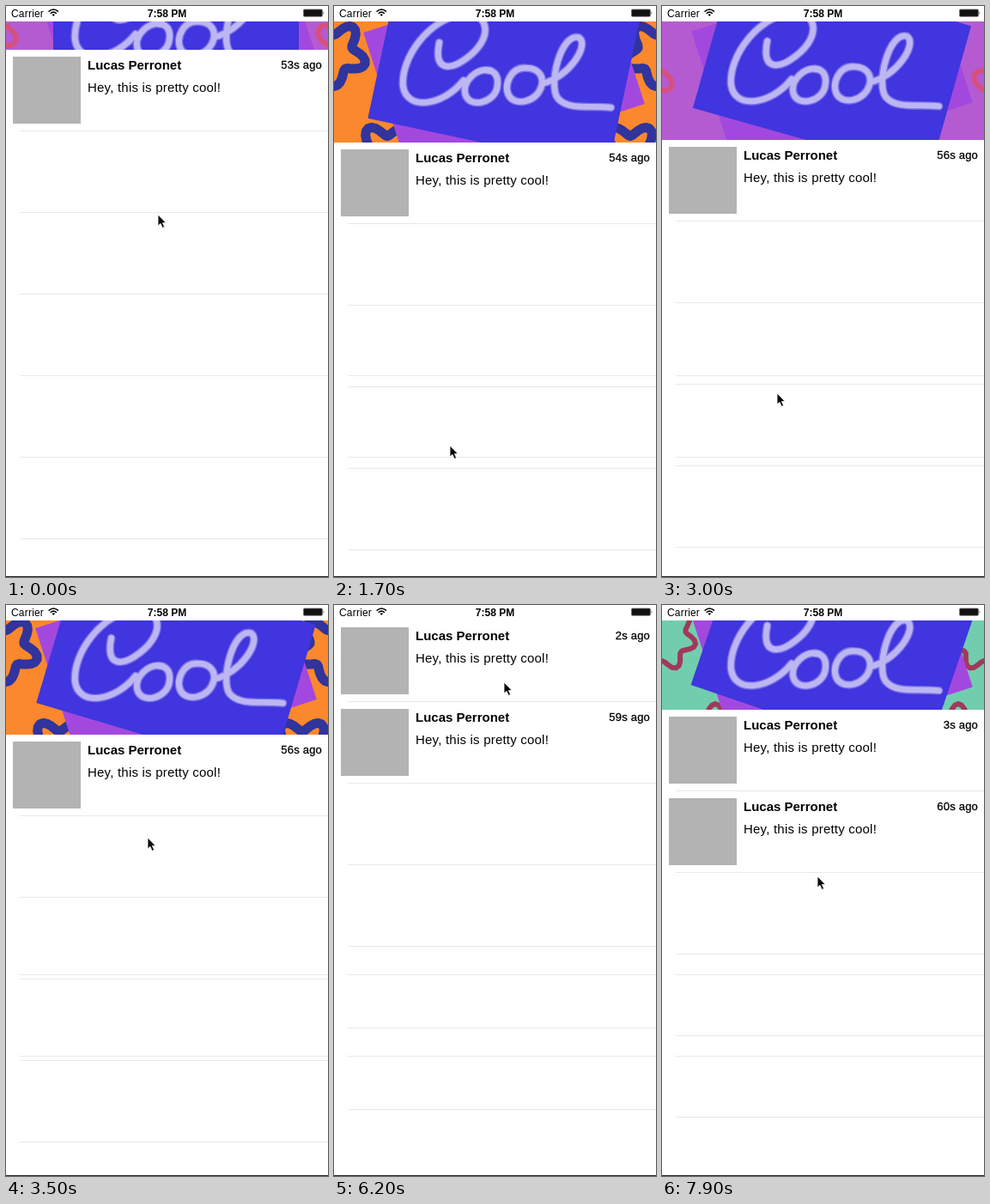
These frames come from a looping animation (375x665 px, 8 s). An HTML page:

```html
<!DOCTYPE html>
<html lang="en">
<head>
<meta charset="utf-8">
<title>Pull to refresh</title>
<style>
  html, body { margin: 0; width: 100%; height: 100%; overflow: hidden; background: #fff; }
  svg { display: block; font: 15px "Liberation Sans", Arial, sans-serif; }
  .name, .clock { font-weight: bold; }
  .msg { letter-spacing: .21px; }
  .ago { font-size: 13px; letter-spacing: .2px; text-anchor: end; stroke: #000; stroke-width: .3px; }
  .status { font-size: 12px; }
  .carrier { letter-spacing: .2px; }
  .brush { fill: none; stroke-linecap: round; stroke-linejoin: round; }
</style>
</head>
<body>
<svg width="375" height="665" viewBox="0 0 375 665">
  <defs>
    <clipPath id="window"><rect id="opening" y="18" width="375" height="0"/></clipPath>
    <g id="cell">
      <rect x="8" y="8" width="79" height="78" fill="#b3b3b3"/>
      <text class="name" x="95" y="23">Lucas Perronet</text>
      <text class="msg" x="95" y="49">Hey, this is pretty cool!</text>
    </g>
    <rect id="sheet" x="-143" y="-90" width="286" height="180"/>
    <path id="script" d="M121-48C114-12 135-14 155-30C186-54 180-85 150-82C110-78 75-30 78 5C82 35 125 30 150-2M182-14C165-18 148 0 152 15C157 33 188 25 190 5C192-8 186-14 178-14M224-17C206-18 198 3 203 15C209 30 238 26 243 3C245-10 236-17 224-17M243 2C275-5 300-45 287-54C265-60 250 5 262 20C275 35 300 28 325 31"/>
  </defs>
  <rect width="375" height="665" fill="#fff"/>
  <g clip-path="url(#window)">
    <g id="art">
      <rect id="ground" y="-120" width="375" height="240"/>
      <path id="doodle" class="brush"/>
      <use href="#sheet" fill="#a348df" transform="translate(198 -16) rotate(-18)"/>
      <use id="card" href="#sheet" fill="#4035de"/>
      <g class="brush" transform="translate(4 0) scale(.98 .96)">
        <use href="#script" stroke="#7a70e8" stroke-width="10"/>
        <use href="#script" stroke="#bcb6f3" stroke-width="7"/>
      </g>
    </g>
  </g>
  <g id="lines" fill="#e9e9eb"></g>
  <g id="fresh"><use href="#cell"/><text class="ago" x="368" y="22"></text></g>
  <g id="old"><use href="#cell"/><text class="ago" x="368" y="22"></text></g>
  <g class="status">
    <text class="carrier" x="6" y="12.5">Carrier</text>
    <text class="clock" x="187.5" y="12.5" text-anchor="middle">7:58 PM</text>
    <g fill="none" stroke="#000" stroke-width="1.5">
      <path d="M49.6 6.6Q55.3 1.3 61 6.6M51.7 8.8Q55.3 5.4 58.9 8.8"/>
      <path d="M53.6 10Q55.3 8.6 57 10L55.3 12Z" fill="#000" stroke="none"/>
    </g>
    <rect x="346.4" y="3.9" width="22" height="8.4" rx="1.2" fill="#111" stroke="#777" stroke-width=".8"/>
    <path d="M369.5 6.3q1.8 1.8 0 3.6z" fill="#333"/>
  </g>
  <rect y="664" width="375" height="1" fill="#222"/>
  <path id="cursor" d="M0 0V13L3 10.4L5.2 15.4L7.6 14.3L5.4 9.6H9.3Z" fill="#0a0a0a" stroke="#fff" stroke-width=".8"/>
</svg>
<script>
const $ = id => document.getElementById(id);
const set = (el, attrs) => { for (const k in attrs) el.setAttribute(k, attrs[k]); };
const move = (el, x, y) => set(el, { transform: `translate(${x} ${y})` });
const LOOP = 8000, STEP = 100, BAR = 18, ROW = 95, SECOND = 1050;

const mix = (a, b, u) => a + (b - a) * u;
const ramp = (t, t0, t1) => Math.min(1, Math.max(0, (t - t0) / (t1 - t0)));
const linear = u => u;
const out = u => 1 - (1 - u) ** 2;
const smooth = u => u * u * (3 - 2 * u);

// Each leg moves the value to a new place: start time, end time, goal, easing
const track = (t, from, ...legs) =>
  legs.reduce((v, [t0, t1, goal, ease = smooth]) => mix(v, goal, ease(ramp(t, t0, t1))), from);

const cursorX = t => track(t, 177, [0, 2200, 133, out], [2900, 4500, 234],
  [4600, 5100, 198], [6300, 7330, 175], [7330, 7900, 181]);
const cursorY = t => track(t, 243, [0, 2200, 591, linear], [2700, 4600, 110, out],
  [4600, 5100, 90], [6300, 7330, 392], [7330, 7900, 316]);

// Rubber band: the further the drag, the less the list follows
const rubber = drag => 620 * (1 - 1 / (1 + .55 * drag / 620));

function pullAt(t) {
  if (t < 2700) return rubber(cursorY(t) - 179);
  if (t < 6300) return track(t, 166, [2700, 3100, 133], [3800, 4300, 0]);
  return rubber(cursorY(t - 30) - 90);
}

// Wavy rings peeking out on both sides of the card
function rings({ y, radius, lobes, wave }) {
  let d = "";
  for (const [cx, cy] of [[0, y], [375, y], [62, y + 118], [345, y + 118]]) {
    for (let a = 0; a <= 360; a += 6) {
      const r = radius + wave * Math.sin(lobes * a * Math.PI / 180);
      d += (a ? "L" : "M") + (cx + r * Math.cos(a * Math.PI / 180)).toFixed(1)
        + " " + (cy + r * Math.sin(a * Math.PI / 180)).toFixed(1);
    }
  }
  return d;
}
const grounds = [
  { fill: "#b45bd2", stroke: "#d6507e", width: 6, y: 0, radius: 11, lobes: 2, wave: 2 },
  { fill: "#72cdae", stroke: "#a1395a", width: 6, y: -33, radius: 34, lobes: 7, wave: 6 },
  { fill: "#fb882c", stroke: "#30349c", width: 11, y: -33, radius: 30, lobes: 5, wave: 8 }
];
for (const g of grounds) g.d = rings(g);

const line = y => {
  const el = document.createElementNS("http://www.w3.org/2000/svg", "rect");
  set(el, { x: 16, y, width: 359, height: 1 });
  return $("lines").appendChild(el);
};
[430, 525].forEach(line);
const dividers = Array.from({ length: 6 }, () => line(0));

const label = (row, age) => { row.lastElementChild.textContent = Math.max(0, Math.floor(age)) + "s ago"; };

function draw(t) {
  const pull = Math.round(pullAt(t)), top = BAR + pull, beat = t / STEP;

  const { fill, stroke, width, d } = grounds[beat % 3];
  const tilt = 19 * (1 - Math.exp(-beat / 17));
  set($("opening"), { height: pull });
  move($("art"), 0, BAR + pull / 2);
  set($("ground"), { fill });
  set($("doodle"), { d, stroke, "stroke-width": width });
  set($("card"), { transform: `translate(198 -16) rotate(${tilt})` });

  const insert = smooth(ramp(t, 3800, 4200));
  move($("fresh"), 0, top);
  set($("fresh"), { opacity: insert });
  move($("old"), 0, top + Math.round(ROW * insert));
  label($("fresh"), (t - 3800) / SECOND);
  label($("old"), 53 + (t + 200) / SECOND);
  dividers.forEach((el, k) => set(el, { y: top + ROW * (k + 1) - 1 }));
  move($("cursor"), Math.round(cursorX(t)), Math.round(cursorY(t)));
}

const start = performance.now();
function tick(now) {
  const t = Math.max(0, now - start) % LOOP;
  draw(Math.floor(t / STEP) * STEP);
  requestAnimationFrame(tick);
}
draw(0);
requestAnimationFrame(tick);
</script>
</body>
</html>
```
